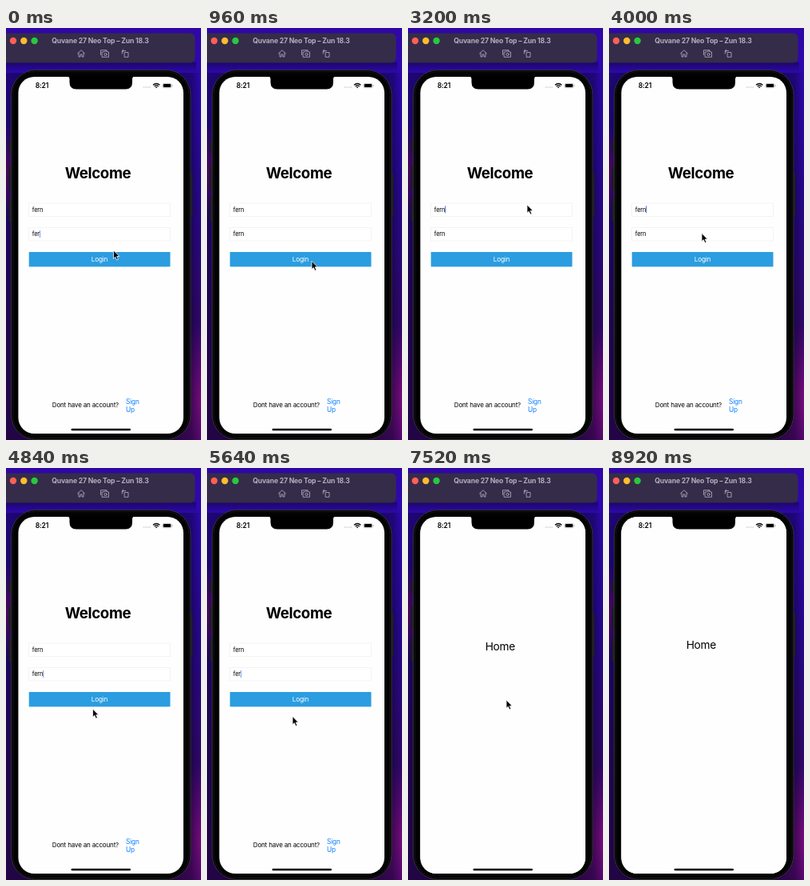
These frames come from a looping animation (244 by 515 pixels, 8960 ms). An HTML page:

```html
<!DOCTYPE html>
<html lang="en">
<head>
<meta charset="utf-8">
<title>Login demo</title>
<style>
  html, body { margin: 0; width: 100%; height: 100%; overflow: hidden; background: #170650; }
  svg { display: block; width: 244px; height: 515px; font-family: Inter, "Liberation Sans", sans-serif; }
  text { letter-spacing: -.02em; white-space: pre; }
  .mid { text-anchor: middle; }
  .icon { fill: none; stroke: #a9a2b6; stroke-width: .9; stroke-linejoin: round; stroke-linecap: round; }
  .field { fill: #fff; stroke: #f0f0f2; stroke-width: .8; }
  .entry { font-size: 7.4px; }
</style>
</head>
<body>
<svg viewBox="0 0 244 515">
  <defs>
    <linearGradient id="wall" x2="0" y2="1">
      <stop offset="0" stop-color="#3007a5"/>
      <stop offset=".12" stop-color="#2d09ad"/>
      <stop offset=".4" stop-color="#270890"/>
      <stop offset=".7" stop-color="#30086c"/>
      <stop offset="1" stop-color="#350760"/>
    </linearGradient>
    <radialGradient id="glow">
      <stop offset="0" stop-color="#7a0c80"/>
      <stop offset="1" stop-color="#7a0c80" stop-opacity="0"/>
    </radialGradient>
    <linearGradient id="shade" x2="1" y2="0">
      <stop offset="0" stop-color="#08021f" stop-opacity=".4"/>
      <stop offset=".5" stop-color="#08021f" stop-opacity=".65"/>
      <stop offset=".95" stop-color="#08021f" stop-opacity=".4"/>
      <stop offset="1" stop-color="#08021f" stop-opacity="0"/>
    </linearGradient>
    <linearGradient id="drop" x2="0" y2="1">
      <stop offset="0" stop-color="#08021f" stop-opacity=".45"/>
      <stop offset="1" stop-color="#08021f" stop-opacity="0"/>
    </linearGradient>
    <clipPath id="display"><rect x="15.400" y="61" width="206.600" height="446" rx="20"/></clipPath>
  </defs>

  <!-- Desktop -->
  <rect width="244" height="515" fill="url(#wall)"/>
  <ellipse cx="247" cy="465" rx="60" ry="95" fill="url(#glow)"/>
  <ellipse cx="-2" cy="180" rx="25" ry="60" fill="url(#glow)"/>
  <rect y="56" width="244" height="459" fill="url(#shade)"/>
  <rect y="43" width="238" height="13" fill="url(#drop)"/>

  <!-- Window bar -->
  <rect x="-8" y="6.500" width="244.500" height="37" rx="6" fill="#352c49"/>
  <circle cx="9" cy="16" r="4.200" fill="#ff5f57"/>
  <circle cx="22.300" cy="16" r="4.200" fill="#febc2e"/>
  <circle cx="35.600" cy="16" r="4.200" fill="#28c840"/>
  <text class="mid" x="118" y="19" font-size="8.650" font-weight="700" fill="#b5aec0">Quvane 27 Neo Top – Zun 18.3</text>
  <g class="icon">
    <path d="M89.500 32 94 27.700 98.500 32M91 31V36H93V33H95V36H97V31"/>
    <path d="M118.500 33.500V27.700H126V29M120.500 30H122L123 29H126L127 30H128.500V36.300H120.500Z"/>
    <circle cx="124.500" cy="33" r="1.600"/>
    <path d="M148.500 30.500H153V36.300H148.500ZM145.300 32V28.500H149.500M146.800 27 145.200 28.500 146.800 30"/>
  </g>

  <!-- Phone body -->
  <g fill="#1d1b24">
    <rect x="3.500" y="141" width="4" height="15" rx="1"/>
    <rect x="3.500" y="173" width="4" height="29" rx="1"/>
    <rect x="3.500" y="213" width="4" height="29" rx="1"/>
    <rect x="229.500" y="182" width="4" height="54" rx="1"/>
  </g>
  <rect x="6.500" y="52.500" width="224.500" height="462" rx="31" fill="#000" stroke="#343339"/>
  <rect x="8.500" y="54.500" width="220.500" height="458" rx="29" fill="#030304" stroke="#151518"/>

  <g clip-path="url(#display)">
    <rect x="15" y="61" width="208" height="446" fill="#fefefe"/>
    <g id="login">
      <text class="mid" x="115" y="187.700" font-size="18.700" font-weight="700">Welcome</text>
      <rect class="field" x="28.500" y="219" width="177" height="16.500"/>
      <rect class="field" x="28.500" y="249.500" width="177" height="16.500"/>
      <text class="entry" id="user" x="32.800" y="229.600"></text>
      <text class="entry" id="pass" x="32.800" y="260.300"></text>
      <rect id="caret" width=".9" height="9" fill="#3158d8"/>
      <rect x="28.700" y="280" width="176.800" height="18.400" fill="#2b9de0"/>
      <text class="mid" x="117" y="292" font-size="8.200" fill="#fff">Login</text>
      <text x="57.800" y="474" font-size="8">Dont have an account?</text>
      <g font-size="8.300" fill="#0a7fff">
        <text x="150" y="469.500">Sign</text>
        <text x="150" y="479.700">Up</text>
      </g>
    </g>
    <g id="home">
      <rect x="15" y="61" width="208" height="446" fill="#fefefe"/>
      <text class="mid" x="115.300" y="226" font-size="13.700">Home</text>
    </g>
  </g>

  <!-- Notch and status -->
  <path d="M77 60.500Q79.500 61 79.500 64V68Q79.500 76.500 88 76.500H149.500Q158 76.500 158 68V64Q158 61 160.500 60.500Z"/>
  <text x="36.700" y="75.400" font-size="8.600" font-weight="600">8:21</text>
  <path d="M172 74H181.500" stroke="#aaa" stroke-width="1.200" stroke-dasharray="1.200 1.300"/>
  <g fill="none" stroke="#000" stroke-width="1.300">
    <path d="M184 71.300Q188.200 67.600 192.400 71.300M185.700 73Q188.200 70.800 190.700 73"/>
    <path d="M187.300 74 188.200 75 189.100 74Z" stroke-width=".8"/>
  </g>
  <rect x="196" y="69.400" width="11" height="5.400" rx="1.600" fill="none" stroke="#999" stroke-width=".6"/>
  <rect x="196.800" y="70.100" width="9.400" height="4" rx="1"/>
  <path d="M208 71.300V73" stroke="#999" stroke-width=".8"/>
  <rect x="81.500" y="500.800" width="74.500" height="2.500" rx="1.250"/>

  <path id="mouse" d="M0 0V10.300L2.300 8.200 4 12 5.900 11.200 4.200 7.500H7.400Z" stroke="#fff" stroke-width=".8" stroke-linejoin="round"/>
</svg>
<script>
const LOOP = 8960, NAME = 'fern';
const $ = id => document.getElementById(id);
const [user, pass, caret, home, mouse] = ['user', 'pass', 'caret', 'home', 'mouse'].map($);

// time, x, y of the pointer tip
const path = [
  [0, 134.5, 278], [400, 134.5, 278], [800, 131, 291.3], [1200, 131, 291.3],
  [1800, 149, 221], [3300, 149, 221], [3960, 116, 256.5], [4400, 116, 256.5],
  [5000, 107, 310.5], [6100, 107, 310.5], [6700, 123, 290], [LOOP, 123, 290]
];
const HOME_AT = 7200, MOUSE_OFF = 8400;

const within = (t, a, b) => t >= a && t < b;
const ease = p => p * p * (3 - 2 * p);

function pointer(t) {
  const i = path.findIndex(k => k[0] > t);
  const [a, b] = [path[i - 1], path[i]];
  const p = ease((t - a[0]) / (b[0] - a[0]));
  return [a[1] + (b[1] - a[1]) * p, a[2] + (b[2] - a[2]) * p];
}

function setText(el, short) {
  const value = short ? NAME.slice(0, -1) : NAME;
  if (el.textContent !== value) el.textContent = value;
}

function draw(t) {
  setText(user, within(t, 2160, 2800));
  setText(pass, t < 280 || within(t, 5400, 5900));

  const inUser = within(t, 1840, 4240);
  const inPass = t < 760 || within(t, 4240, 6900);
  const focus = inUser ? user : pass;
  caret.setAttribute('visibility', inUser || inPass ? 'visible' : 'hidden');
  caret.setAttribute('opacity', inUser ? 1 : .7);
  caret.setAttribute('x', 32.8 + focus.getComputedTextLength());
  caret.setAttribute('y', inUser ? 222.3 : 253);

  const shown = t >= HOME_AT;
  const rise = shown ? 446 * Math.exp((HOME_AT - t) / 59) : 0;
  home.setAttribute('visibility', shown ? 'visible' : 'hidden');
  home.setAttribute('transform', `translate(0 ${rise.toFixed(2)})`);

  mouse.setAttribute('visibility', t < MOUSE_OFF ? 'visible' : 'hidden');
  mouse.setAttribute('transform', `translate(${pointer(t)})`);
}

const start = performance.now();
function tick() {
  draw((performance.now() - start) % LOOP);
  requestAnimationFrame(tick);
}
tick();
</script>
</body>
</html>
```
